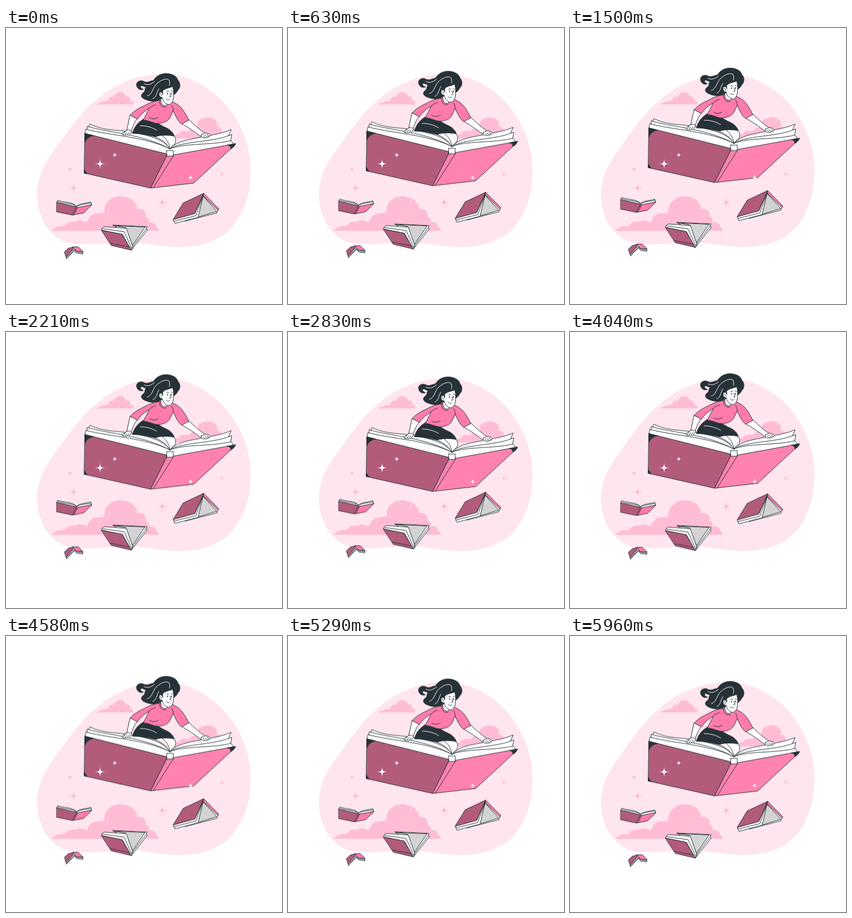
An HTML page that plays this animation: 500 px wide and 500 px high, repeating every 6000 ms.

```html
<!DOCTYPE html>
<html lang="en">
<head>
<meta charset="utf-8">
<title>Flying books</title>
<style>
html, body { margin: 0; width: 100%; height: 100%; overflow: hidden; background: #fff; }
svg { display: block; width: 100vw; height: 100vh; }
.float { animation: rise 1.5s linear infinite alternate; }
.slow { animation-duration: 3s; }
@keyframes rise { to { transform: translateY(-10px); } }
.ink { stroke: #263238; stroke-width: 1; stroke-linejoin: round; stroke-linecap: round; }
.pale { fill: #ffbdd5; }
.white { fill: #fff; }
.pink { fill: #ff7bac; }
.plum { fill: #b25b7b; }
.cover { fill: #ff82b0; }
.grey { fill: #d3d3d3; }
.dark { fill: #263238; }
.line { fill: none; }
.shine { fill: none; stroke: #fff; }
</style>
</head>
<body>
<svg viewBox="0 0 500 500">
  <defs>
    <path id="star" d="M0-10C.3-1.500 1.500-.3 10 0C1.500.3.3 1.500 0 10C-.3 1.500-1.500.3-10 0C-1.500-.3-.3-1.500 0-10Z"/>
  </defs>

  <!-- backdrop -->
  <path fill="#ffe5ee" d="M275 84C318 82 352 96 385 125C420 158 443 205 443 260C443 300 430 345 398 372C370 393 335 398 305 397C265 395 245 386 205 388C175 391 150 393 122 391C87 388 57 351 56 303C56 262 78 234 99 205C121 175 140 148 172 123C203 100 235 86 275 84Z"/>
  <g class="pale">
    <path d="M163 138.500C166 136 168 136 172 135C176 131 182 133 185 132C185 126 190 123 196 125C197 114 215 113 217 124C223 123 226 127 225 132C229 131 231 135 231 138.500Z"/>
    <path d="M300 200C305 193 309 193 313 192C316 185 325 186 331 187C334 182 340 180 347 178C345 167 355 162 366 162C378 162 384 170 382 178C390 179 393 186 390 191C394 192 396 196 395 200Z"/>
    <path d="M82 367.500C88 363 90 360 96 359C101 358 104 360 107 358C111 351 119 350 126 351C131 347 139 348 145 352C150 348 150 341 158 337C166 334 172 337 178 334C178 315 191 305 207 305C225 305 237 315 238 329C246 325 255 332 253 342C258 343 260 348 258 352C266 351 273 355 272 361C275 361 277 364 276 367.500Z"/>
    <use href="#star" transform="translate(116 255.500) scale(.7)"/>
    <use href="#star" transform="translate(122.500 289.500)"/>
    <use href="#star" transform="translate(283 316)"/>
    <use href="#star" transform="translate(391 265) scale(.65)"/>
  </g>

  <!-- small books -->
  <g class="float slow ink">
    <g>
      <path class="white" d="M92 316L94 312C106 317 119 314 128 323C134 317 146 318 153.500 315L155 320L130 327Z"/>
      <path class="line" d="M93 314C106 319 119 317 128 323C136 319 147 319 154 317"/>
      <path class="plum" d="M91.500 316L128 324L120.500 339L91.500 333Z"/>
      <path class="pink" d="M130 325L156 320L140.500 335L120.500 339L128 325Z"/>
      <path class="line" d="M130 325L123 338.500"/>
    </g>
    <g>
      <path class="white" d="M109 415L119 404L124 400L129 404.500L139.500 405.500L139 409.500L128 408L124 403.500L118 409L110 418Z"/>
      <path class="plum" d="M106 405.500L113 399L123 396.500L119 404L109 415Z"/>
      <path class="pink" d="M121 396.500L131 396.500L139.500 405L128 404.500Z"/>
      <path class="line" d="M109.500 416.500L124 402L128 406L139 407.500"/>
    </g>
    <g>
      <path class="white" d="M194 357L255.500 360L254 364L256 366L227 402.500L214 370Z"/>
      <path class="grey" d="M194 358L252 360.500L229 394L217 362Z"/>
      <path class="white" d="M175 362L178 360L218 363L230 397L227 402.500L211 374L173 366Z"/>
      <path class="plum" d="M173 366.500L210 373.500L227 402.500L191 394Z"/>
      <path class="line" d="M175 363.500L214 369L228 400M189 390L224 397M254 364L228 398"/>
    </g>
    <g>
      <path class="pink" d="M358 299.500L386 328L382 331L356 303Z"/>
      <path class="white" d="M356 303L384 330L382 335L324 350L346 342Z"/>
      <path class="grey" d="M357 305L382 332L348 342.500Z"/>
      <path class="white" d="M358 301L348 343L306 354L303 347L342 336Z"/>
      <path class="plum" d="M303 346.500L321 317L358 299.500L342 336Z"/>
      <path class="line" d="M304 350L344 340L357 304"/>
    </g>
  </g>

  <!-- rider and large book -->
  <g class="float ink">
    <!-- pages -->
    <path class="white" d="M143 191L145 183L147 184L147 178L150 179L152 174C180 188 206 183 232 190C264 195 288 204 297 219C310 203 340 201 362 196C379 193 394 190 408 184L403 195L409 193L407 204L411 208L411 212L303 234H291V230Z"/>
    <path class="line" d="M150 179C188 190 248 192 297 219M147 184C190 195 253 197 297 219M297 219C316 205 374 207 403 195M297 219C320 208 373 213 407 204"/>

    <!-- legs and skirt -->
    <path class="white" d="M268 196C279 192 299 192 304 195C309 200 308 209 304 212C301 213 299 217 297 219C290 207 280 201 268 196Z"/>
    <path class="line" d="M283 195C292 202 296 210 297 219"/>
    <path class="dark" d="M249 165C238 172 232 180 229 191C244 191 257 194 270 197C281 193 296 194 305 196C302 187 294 182 286 179L274 172Z"/>
    <path class="shine" d="M243 177C253 177 263 179 273 185"/>

    <!-- arms -->
    <path class="white" d="M225 158L238 164C232 171 229 180 226 188L219 186Z"/>
    <path class="white" d="M331 166L318 173C330 180 342 188 352 196L361 191C350 184 341 175 331 166Z"/>
    <path class="white" d="M219 185L211 190C209 192 210 194 212 193C212 195 215 195 216 193C216 195 219 195 220 193C221 195 224 194 225 191L228 187C225 185 222 184 219 185Z"/>
    <path class="line" d="M212 193L216 188M216 193L219 189M220 193L223 189"/>
    <path class="white" d="M354 193L362 190L368 192C371 194 370 196 368 196C368 198 366 198 365 197C365 199 362 200 361 198C360 200 357 200 357 198C355 199 353 198 354 193Z"/>
    <path class="line" d="M368 196L364 193M365 198L360 194M361 199L357 195"/>

    <!-- shirt -->
    <path class="pink" d="M280 131C268 132 259 136 250 141C239 146 231 151 225 158L238 165C244 157 250 151 259 146C256 154 251 161 249 167C259 167 267 173 276 173C286 172 295 169 298 160L303 150C307 159 311 168 318 174L331 167C326 156 318 141 306 136C302 133 297 133 292 132Z"/>
    <path class="line" d="M259 146C263 142 267 140 271 139M303 150C303 146 302 143 300 140M260 162C265 166 271 165 276 162"/>

    <!-- head -->
    <path class="white" d="M280 124L281 135C283 141 289 142 292 139L293 132Z"/>
    <path class="line" d="M278 132C278 139 283 145 290 143"/>
    <path class="dark" d="M267 95C274 84 285 81 296 83C305 85 310 89 311 94C317 100 316 109 311 113C309 118 306 119 303 122L281 128C276 133 262 134 254 130C244 127 243 121 249 117C253 114 250 111 254 107C250 107 247 103 244 105C243 108 246 110 249 111C243 114 236 109 236.500 102C237 96 245 94 250 97C256 100 260 96 267 95Z"/>
    <path class="white" d="M284 114C288 109 296 109 302 106C304 113 304 122 303 129C301 136 297 140 292 138C287 136 284 131 283 126C277 126 275 117 280 116C282 116 283 118 284 120Z"/>
    <path class="line" d="M279 119C281 119 282 121 282 123M291 115Q293 113 295 115M299 114Q301 113 302 115M297 118L299 124L296 125M290 128C292 131 295 131 297 129"/>
    <path class="dark" d="M292.500 118v1.800M299.800 118v1.800" style="stroke-width:1.500"/>
    <path class="shine" d="M256 123C265 121 266 108 272 102C279 95 290 90 295 94C297 96 297 101 296 104M250 101C257 105 264 101 269 97M266 128C273 126 273 115 277 110"/>

    <!-- covers -->
    <path class="plum" d="M143 191L291 228V232L262 290L142 263Z"/>
    <path class="cover" d="M303 230L416 209.500C414 214 411 217 407 219L340 281L262 290L291 232H303Z"/>
    <path class="line" d="M291 222V232M291 222H303V232L267 289"/>
    <path class="dark" d="M143 191L159 195C151 196 145 201 143 207ZM142 257L147 264L142 263ZM401 212L416 209.500C414 214 411 217 407 219C408 215 405 213 401 212Z"/>
  </g>

  <g class="white">
    <use href="#star" transform="translate(170.500 246)"/>
    <use href="#star" transform="translate(197 230) scale(.6)"/>
    <use href="#star" transform="translate(334.500 271) scale(.65)"/>
  </g>
</svg>
</body>
</html>
```
